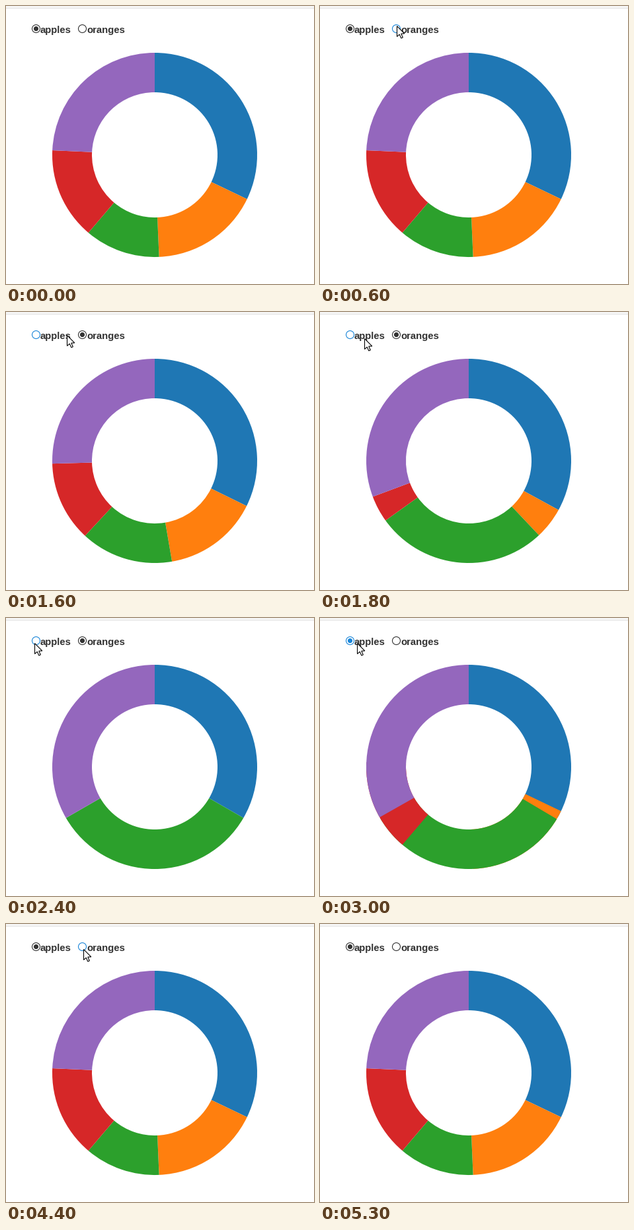
Recreate the animation shown at these times as a matplotlib script. Size 466 by 422 pixels, loop 5.7 s.

```python
import numpy as np
import matplotlib.pyplot as plt
from matplotlib.animation import FuncAnimation
from matplotlib.patches import Circle, Polygon, Rectangle, Wedge

W, H, DPI = 466, 422, 100
STEP, LOOP = 100, 5700
ENTER, TO_ORANGES, TO_APPLES, RESTART = 100, 1363, 2890, 4800
DURATION = 750

COLORS = ["#1f77b4", "#ff7f0e", "#2ca02c", "#d62728", "#9467bd"]
APPLES = [53245, 28479, 19697, 24037, 40245]
ORANGES = [200, 0, 200, 0, 200]
DARK, HOVER = "#333333", "#1a86d9"

# Pointer moves: start time, end time, where it comes to rest
ENTRY = (453, 397)
MOVES = [
    (ENTER, 600, (116, 30)),
    (1400, 1800, (67, 40)),
    (1800, 2200, (43, 38)),
    (2400, 2500, (52, 44)),
    (2600, 2800, (43, 38)),
    (2900, 3300, (125, 40)),
    (3900, 4100, (117, 38)),
]
ARROW = np.array([(0, 0), (0, 16), (3.7, 12.6), (6.3, 18.4), (8.8, 17.3),
                  (6.3, 11.6), (11.3, 11.4)]) + 0.5


def px(n):
    return n * 72 / DPI


def edges(values):
    return np.concatenate([[0], np.cumsum(values)]) / sum(values) * 360


def cubic(t):
    t = min(max(t, 0), 1)
    return 4 * t ** 3 if t < 0.5 else 1 - 4 * (1 - t) ** 3


def smooth(t):
    t = min(max(t, 0), 1)
    return t * t * (3 - 2 * t)


A, O = edges(APPLES), edges(ORANGES)


def slices(t):
    """Start and end angle of every slice, clockwise from the top."""
    if t < TO_ORANGES or t >= RESTART:
        e = A
    elif t < TO_APPLES:
        e = A + (O - A) * cubic((t - TO_ORANGES) / DURATION)
    else:
        e = O + (A - O) * cubic((t - TO_APPLES) / DURATION)
    # Slices that come back appear at full size beneath their neighbours.
    back = t >= TO_APPLES
    return [(A if back and ORANGES[i] == 0 else e)[i:i + 2] for i in range(5)]


def pointer(t):
    if not ENTER <= t < RESTART:
        return None
    tip = np.array(ENTRY, float)
    for start, end, stop in MOVES:
        tip += (np.array(stop) - tip) * smooth((t - start) / (end - start))
    return np.round(tip)


class Radio:
    def __init__(self, x, label, width):
        self.x0, self.x1 = x, x + width
        center = (x + 6.5, 34.5)
        self.ring = ax.add_patch(Circle(center, 6, fc="white", lw=px(1.1)))
        self.dot = ax.add_patch(Circle(center, 3.6, lw=0))
        ax.text(x + 13, 41, label, family="Liberation Sans", weight="bold",
                size=px(14.85), color=DARK, va="baseline", ha="left")

    def update(self, checked, tip):
        hover = (tip is not None and self.x0 <= tip[0] <= self.x1
                 and 26 <= tip[1] <= 43)
        color = HOVER if hover else DARK
        self.ring.set_edgecolor(color)
        self.dot.set_facecolor(color)
        self.dot.set_visible(checked)


fig = plt.figure(figsize=(W / DPI, H / DPI), dpi=DPI, facecolor="white")
ax = fig.add_axes([0, 0, 1, 1])
ax.set_xlim(0, W)
ax.set_ylim(H, 0)
ax.axis("off")

ax.add_patch(Rectangle((0, 0), W, 3, fc="#f6f6f6", lw=0))
ax.add_patch(Rectangle((0, 3), W, 1, fc="#e4e4e4", lw=0))

apples = Radio(39, "apples", 61)
oranges = Radio(109, "oranges", 72)
wedges = [ax.add_patch(Wedge((225, 226), 155, 0, 90, width=60, fc=c, lw=0,
                             zorder=2 + i / 10))
          for i, c in enumerate(COLORS)]
arrow = ax.add_patch(Polygon(ARROW, closed=True, fc="white", ec="black",
                             lw=px(1.1), joinstyle="miter", zorder=5))


def draw(frame):
    t = frame * STEP
    for wedge, (start, end) in zip(wedges, slices(t)):
        wedge.set_visible(end - start > 1e-3)
        wedge.set_theta1(start - 90)
        wedge.set_theta2(end - 90)
    tip = pointer(t)
    arrow.set_visible(tip is not None)
    if tip is not None:
        arrow.set_xy(ARROW + tip)
    on_oranges = TO_ORANGES <= t < TO_APPLES
    apples.update(not on_oranges, tip)
    oranges.update(on_oranges, tip)
    return [*wedges, arrow]


anim = FuncAnimation(fig, draw, frames=LOOP // STEP, interval=STEP,
                     repeat=True, repeat_delay=0, blit=False)
plt.show()
```
